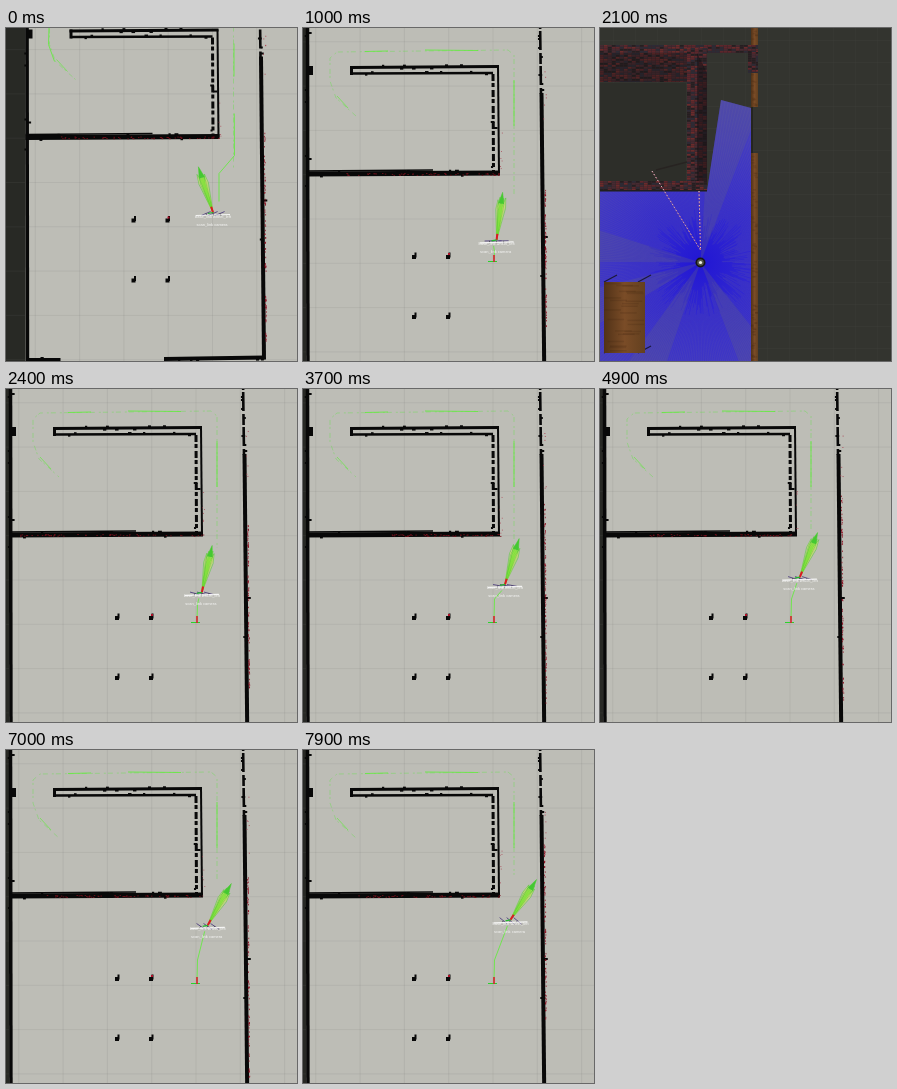
Recreate the animation shown at these times as an HTML page with a canvas. Size 291 by 333 pixels, loop 8000 ms.

```html
<!DOCTYPE html>
<html lang="en">
<head>
<meta charset="utf-8">
<title>Robot navigation</title>
<style>
html, body { margin: 0; width: 100%; height: 100%; overflow: hidden; background: #bdbdb6; }
canvas { display: block; width: 291px; height: 333px; }
</style>
</head>
<body>
<canvas id="stage" width="291" height="333"></canvas>
<script>
const W = 291, H = 333, LOOP = 8000, STEP = 100;
const SIM_START = 1300, SIM_END = 2300;
const PAN_START = 200, PAN_END = 800;
const BLACK = '#080808', GREEN = '#68e944';
const g = document.getElementById('stage').getContext('2d');

function random(seed) {
  let s = (seed * 2654435761 + 12345) >>> 0;
  return () => {
    s = (s + 0x6D2B79F5) >>> 0;
    let v = Math.imul(s ^ s >>> 15, 1 | s);
    v ^= v + Math.imul(v ^ v >>> 7, 61 | v);
    return ((v ^ v >>> 14) >>> 0) / 4294967296;
  };
}

// Steady climb with a swerve halfway; the heading turns from left to right
function poseAt(t) {
  const s = t / 1000, turn = Math.max(0, 1 - s);
  const swerve = s > 2.5 ? 4 * Math.sin((s - 2.5) * 1.31) : 0;
  return {
    x: 192 + 1.6 * s - 1.5 * turn + swerve,
    y: 218 - 6.1 * s + 3 * turn,
    angle: -1.51 + 0.065 * s - 0.37 * turn
  };
}

function rect(color, x, y, w, h) {
  g.fillStyle = color;
  g.fillRect(x, y, w, h);
}

function trace(p) {
  g.beginPath();
  for (let i = 0; i < p.length; i += 2) g.lineTo(p[i], p[i + 1]);
}

function poly(color, ...p) {
  trace(p);
  g.fillStyle = color;
  g.fill();
}

function line(color, width, ...p) {
  trace(p);
  g.strokeStyle = color;
  g.lineWidth = width;
  g.stroke();
}

function dashed(pattern, paint, offset = 0) {
  g.setLineDash(pattern);
  g.lineDashOffset = offset;
  paint();
  g.setLineDash([]);
}

function grid(color, x0, y0, gap) {
  for (let x = x0; x < 330; x += gap) line(color, 1, x, -30, x, 400);
  for (let y = y0; y < 400; y += gap) line(color, 1, -30, y, 330, y);
}

// Straight wall with small cells sticking out on either side
function wall(x1, y1, x2, y2, width, rough = 0.1) {
  line(BLACK, width, x1, y1, x2, y2);
  const r = random(x1 + y1 * 7), n = Math.hypot(x2 - x1, y2 - y1) / 3;
  const flat = Math.abs(x2 - x1) > Math.abs(y2 - y1);
  for (let i = 0; i < n; i++) {
    if (r() > rough) continue;
    const k = i / n, off = (r() < 0.5 ? -1 : 1) * width / 2;
    const x = x1 + (x2 - x1) * k, y = y1 + (y2 - y1) * k;
    rect(BLACK, x - 1 + (flat ? 0 : off), y - 1 + (flat ? off : 0), 2 + r() * 2, 2);
  }
}

function pillar(x, y) {
  rect(BLACK, x - 2, y - 2, 4, 4);
  rect(BLACK, x + 0.5, y - 4.5, 2, 5);
}

function drawMap() {
  rect('#bdbdb6', -30, -30, 360, 420);
  rect('#282925', -30, -30, 33, 460);
  grid('rgba(110,112,108,.13)', -31.5, -30.5, 44.3);

  wall(4.5, -10, 5, 400, 3.5, 0.06);
  rect(BLACK, 4, 38, 6, 9);

  wall(47, 39.5, 196, 38.5, 3);
  wall(48, 45.5, 190, 45, 2.4);
  rect(BLACK, 47, 38, 3, 9);
  wall(195, 38, 196, 146, 2, 0.02);
  dashed([7, 2, 4, 3], () => wall(190, 46, 190.5, 143, 3));
  wall(3, 146, 197, 145, 5, 0.06);
  line(BLACK, 1.5, 3, 143, 130, 142);

  dashed([11, 2, 19, 3], () => wall(237, -10, 238, 66, 2.6, 0.2));
  wall(238.5, 65, 241.5, 368, 4, 0.04);
  wall(141.5, 367.5, 242, 366, 4);
  wall(4, 368, 38, 368, 3);

  for (const x of [111, 145]) for (const y of [229, 289]) pillar(x, y);
}

// Laser hits along the walls, flickering with every step
function drawScan(step, y) {
  const r = random(step + 40), top = y - 45 - r() * 50, span = 115 + r() * 115;
  for (let i = 0; i < 80; i++) {
    const py = top + span * r();
    rect('rgba(140,8,28,.8)', 240 + py / 130 + r(), py, 0.9, 1.5);
  }
  const left = 10 + r() * 80;
  for (let i = 0; i < 60; i++) rect('#7a101c', left + (197 - left) * r(), 145 + r() * 2, 1.5, 0.8);
  for (let i = 0; i < 6; i++) {
    rect('#a8384a', 196 + r() * 3, 100 + r() * 47, 0.8, 0.8);
    rect('#a8384a', 240 + r() * 3, 40 + r() * 70, 0.9, 0.9);
  }
  rect('#b01028', 145, 225, 2, 2);
}

function drawPath(step, early, end) {
  const faint = 'rgba(98,225,70,.45)';
  dashed([2, 2, 5, 4], () => {
    line(faint, 0.9, 53, 88, 33, 70, 27, 53, 27, 30, 34, 24, 205, 22, 211, 27, 211, end);
  }, step * 3);
  line(GREEN, 0.7, 34, 68, 45, 80);
  if (early) {
    line(GREEN, 0.9, 26.5, 36, 26, 53, 32, 70);
    line(GREEN, 0.9, 211.5, 52, 211.5, 85);
    line(GREEN, 0.9, 211.8, 122, 212, 164, 196.5, 182, 196.5, 210);
  } else {
    line(GREEN, 0.9, 62, 23.5, 85, 23);
    line(GREEN, 0.9, 122, 22, 175, 22.5);
    line(GREEN, 0.9, 211, 52, 211, 98);
  }
}

function arrow(angle, len, width, shaft, head) {
  g.save();
  g.rotate(angle);
  const neck = len * 0.76;
  poly(shaft, 0, -0.7, neck, -width * 0.7, neck, width * 0.7, 0, 0.7);
  poly(head, neck, -width, len, 0, neck, width);
  line('rgba(70,205,45,.75)', 0.6, 0, 0, neck, -width, len, 0, neck, width, 0, 0);
  g.restore();
}

function drawRobot(step, early, { x, y, angle }) {
  const r = random(step + 700);
  if (!early) {
    line(GREEN, 0.9, 191, 231, 191.5, Math.max(y + 12, 210), x - 3, y + 6);
    line('#2bd32b', 1, 185, 233.5, 194, 233.5);
    line('#d8202c', 1.6, 191, 227, 191, 234);
  }

  const pale = 'rgba(231,224,110,.55)';
  g.save();
  g.translate(x, y);
  for (let i = -2; i <= 2; i++) arrow(angle + i * 0.045, 39 + r() * 4, 2, pale, pale);
  arrow(angle, 48, 2.8, 'rgba(130,226,60,.8)', '#45c832');

  // Coordinate frames of the body and both wheels
  const spin = angle + (r() - 0.5) * 0.6;
  for (const side of [-1, 0, 1]) {
    const c = Math.cos(spin) * 5, s = Math.sin(spin) * 5, ox = side * 7;
    line('#50407f', 0.9, ox - s, 1 + c, ox + s, 1 - c);
    line('#3b3b42', 0.9, ox - c / 2, 1 - s / 2, ox, 1);
  }
  line('#de1428', 2, 0, 0, Math.cos(angle) * 6, Math.sin(angle) * 6);
  line('#22b82e', 1.2, 0, 0, -5, 1);

  line('rgba(255,255,255,.85)', 1.2, -17, 3, 17, 2);
  g.font = '4px "Liberation Sans", sans-serif';
  g.textAlign = 'center';
  g.fillStyle = 'rgba(255,255,255,.9)';
  g.fillText('base_link wheel_left', 0, 5);
  g.fillText('scan_link camera', -1, 13);
  g.restore();
}

function bricks(x, y, w, h) {
  rect('#38262a', x, y, w, h);
  const r = random(x + y * 3), tones = ['#5d262b', '#2c2b36', '#472a31', '#251f21', '#6b2b2b'];
  for (let py = y; py < y + h; py += 2) {
    for (let px = x; px < x + w; px += 4) {
      rect(tones[r() * 5 | 0], px, py, Math.min(3.5, x + w - px), Math.min(1.6, y + h - py));
    }
  }
}

function wood(x, y, w, h) {
  const shade = g.createLinearGradient(x, 0, x + w, 0);
  ['#513217', '#7a4c27', '#63401f'].forEach((c, i) => shade.addColorStop(i / 2, c));
  rect(shade, x, y, w, h);
  const r = random(x + y);
  for (let i = 0; i < h / 3; i++) rect('rgba(45,24,10,.14)', x + r() * w * 0.6, y + r() * h, w * 0.4, 1.5);
}

function drawBeams(cx, cy) {
  g.save();
  trace([0, 163, 107, 163, 121, 72, 151, 80, 151, H, 0, H]);
  g.clip();
  const glow = g.createRadialGradient(cx, cy, 2, cx, cy, 165);
  ['#2217d4', '#2f25d0', '#3a31c9', '#433bc0', '#4a44b4'].forEach((c, i) => glow.addColorStop(i / 4, c));
  rect(glow, 0, 60, 151, 273);

  const ray = (a, d) => [cx + Math.cos(a) * d, cy + Math.sin(a) * d];
  for (const a of [-1.36, 1.05, 2.05, 2.75, 3.3]) {
    poly('rgba(90,88,140,.32)', cx, cy, ...ray(a - 0.15, 240), ...ray(a + 0.15, 240));
  }
  const r = random(5);
  for (let a = 0; a < Math.PI * 2; a += 0.019) {
    line('rgba(110,108,150,.22)', 0.7, ...ray(a, 20 + r() * 35), ...ray(a, 240));
  }
  g.restore();
}

function drawSim() {
  const cx = 100.5, cy = 234.5;
  rect('#33342f', 0, 0, W, H);
  grid('rgba(70,71,66,.22)', 13.5, 12.5, 22);
  drawBeams(cx, cy);

  wood(151, 0, 7, 17);
  rect('#2d2e29', 0, 55, 86, 98);
  bricks(0, 25, 87, 29);
  rect('rgba(20,18,18,.3)', 0, 25, 87, 29);
  bricks(0, 17, 158, 8);
  bricks(148, 24, 10, 21);
  bricks(87, 20, 20, 143);
  poly('rgba(22,18,20,.55)', 97, 25, 107, 45, 107, 163, 97, 153);
  bricks(0, 153, 107, 9);
  rect('#211f1f', 0, 162, 107, 1.5);
  line('#272321', 1.5, 56, 142, 87, 134);

  wood(151, 45, 7, 34);
  wood(151, 125, 7, 208);
  rect('#25251f', 151, 79, 2, 46);

  for (const x of [4, 38]) for (const y of [254, 325]) line('#1b1838', 1.2, x, y, x + 13, y - 7);
  wood(4, 254, 41, 71);

  for (const [x, y] of [[52, 143], [99, 163]]) {
    dashed([2, 1.5], () => line('#b9586f', 1, x, y, cx, 222));
    dashed([1, 2.5], () => line('#ddd', 0.9, x, y, cx, 222));
  }
  ['#171716', '#56584a', '#f0f0e8'].forEach((color, i) => {
    g.fillStyle = color;
    g.beginPath();
    g.arc(cx, cy, 5 - i * 1.7, 0, 7);
    g.fill();
  });
}

function draw(t) {
  if (t >= SIM_START && t < SIM_END) return drawSim();
  const step = t / STEP, pose = poseAt(t), early = t < PAN_END;
  const k = Math.min(1, Math.max(0, (t - PAN_START) / (PAN_END - PAN_START)));
  const shift = 1 - k * k * (3 - 2 * k);
  g.save();
  g.translate(16.5 * shift, -36.5 * shift);
  drawMap();
  drawScan(step, pose.y);
  drawPath(step, early, pose.y - 45);
  drawRobot(step, early, pose);
  g.restore();
}

let start, shown = -1;
function tick(now) {
  start ??= now;
  const t = Math.floor(((now - start) % LOOP) / STEP) * STEP;
  if (t !== shown) draw(shown = t);
  requestAnimationFrame(tick);
}
draw(0);
requestAnimationFrame(tick);
</script>
</body>
</html>
```
